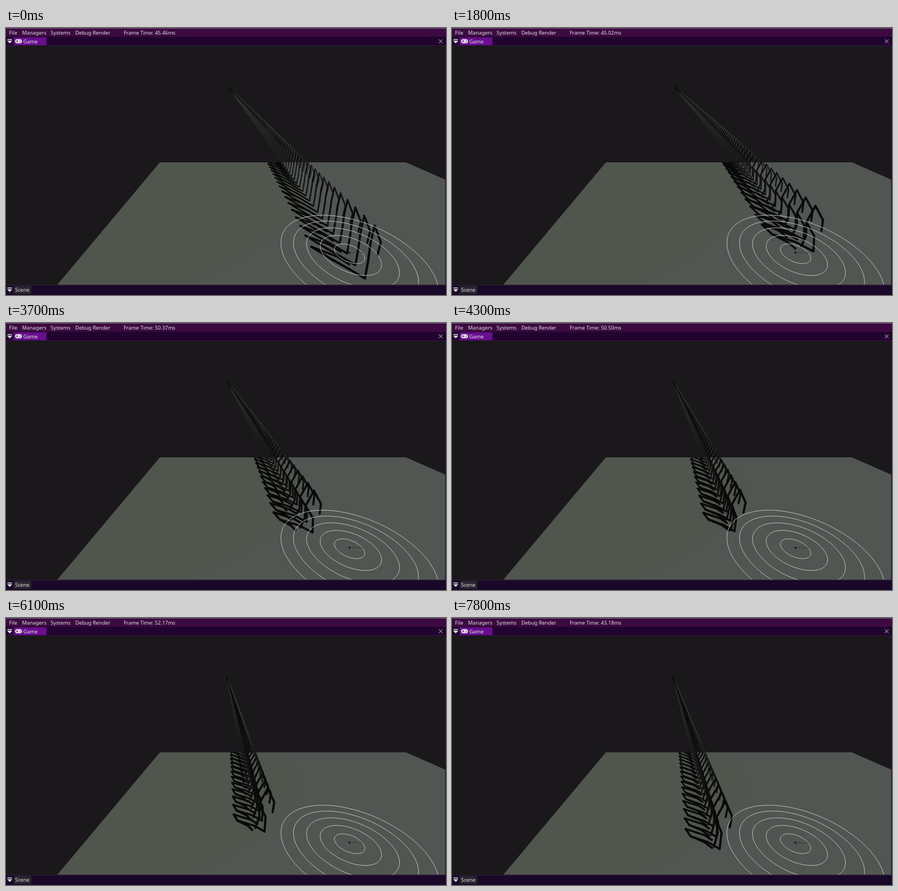
These frames come from a looping animation (800 px wide and 485 px high, 7.9 s). An HTML page with a canvas:

```html
<!DOCTYPE html>
<html lang="en">
<head>
<meta charset="utf-8">
<title>Game viewport</title>
<style>
  html, body { margin: 0; width: 100%; height: 100%; overflow: hidden; background: #1a181b; }
  canvas, svg { position: absolute; left: 0; top: 0; width: 800px; height: 485px; }
  text { font: 9.35px "Noto Sans", "Open Sans", sans-serif; fill: #e4dfe6; white-space: pre; }
</style>
</head>
<body>
<canvas id="scene" width="800" height="485"></canvas>
<svg viewBox="0 0 800 485">
  <g id="rings" fill="none" stroke="#c9cec8" stroke-width=".9"></g>
  <path d="M624 408H648" stroke="#30332f" stroke-width=".8"/>
  <path d="M622 406.5l4 .5-1 4z" fill="#080808"/>

  <path d="M0 0H800V16H0z" fill="#3c0a41"/>
  <path d="M0 0H800V1H0z" fill="#77617a"/>
  <path d="M0 16H800V32H0z" fill="#20032e"/>
  <path d="M14 17H73.5V31.5H14z" fill="#680e8e"/>
  <path d="M0 31H800V32H0z" fill="#3b0d50"/>
  <path d="M798.5 32H800V467H798.5z" fill="#2a1733"/>
  <path d="M0 466.5H800V485H0z" fill="#190827"/>
  <path d="M0 466.5H800V467.5H0z" fill="#34243c"/>
  <path d="M14 468.5H46V483H14z" fill="#29262e"/>

  <g id="fold" fill="#e4dfe6"><path d="M2.5 20h8.5v1.4H2.5zM2 23h9.5l-4.7 5z"/></g>
  <use href="#fold" y="451.5"/>
  <rect x="16.5" y="20.3" width="12.6" height="7.4" rx="3.7" fill="#e4dfe6"/>
  <path d="M18.4 24h3.6M20.2 22.2v3.6M24.4 25.2h1.4M26.2 22.8h1.4" stroke="#680e8e" stroke-width="1.2"/>
  <path d="M786.8 20.7l7 7m0-7l-7 7" stroke="#d5ced8"/>
  <text x="5.5" y="12">File</text>
  <text x="29.3" y="12">Managers</text>
  <text x="81" y="12">Systems</text>
  <text x="126" y="12">Debug Render</text>
  <text x="214" y="12" id="stat"></text>
  <text x="31.5" y="27.5">Game</text>
  <text x="16.5" y="479">Scene</text>
</svg>
<script>
const ctx = document.getElementById('scene').getContext('2d');
const stat = document.getElementById('stat');
const VANISH = { x: 400, y: 102 }, FAR_EDGE = 244;
const STEP = 0.074, COUNT = 560, STRIDE = 0.775;

// Rings are circles on a tilted plane; perspective enlarges and shifts the outer ones
document.getElementById('rings').innerHTML = [1, 2, 3, 4, 5].map(n => {
  let d = '';
  for (let i = 0; i < 72; i++) {
    const a = i * Math.PI / 36;
    const x = 624 + 0.77 * n * n + (27.4 + 0.26 * n) * n * Math.cos(a);
    const y = 409 + 1.04 * n * n + (17.7 + 0.26 * n) * n * Math.sin(a + 0.49);
    d += (i ? 'L' : 'M') + x.toFixed(1) + ' ' + y.toFixed(1);
  }
  return `<path d="${d}Z"/>`;
}).join('');

function ease(t, start, span) {
  const u = Math.min(1, Math.max(0, (t - start) / span));
  return u * u * (3 - 2 * u);
}

// The front walker: its place on the floor sets its size, the stride moves its limbs
function walker(t) {
  const floor = 378 + 3.8 * (t - 4.5) ** 2;
  const size = 0.272 * (floor - VANISH.y);
  const x = 670 - 195 * ease(t, 1.2, 4.6) + 22 * ease(t, 6, 1);
  const s = Math.sin(2 * Math.PI * t / STRIDE);
  const at = (dx, dy) => ({ x: x + dx * size, y: floor - size + dy * size });

  const top = at(0, 0), hip = at(-0.2 + 0.12 * ease(1 - t, 0, 1), 0.36);
  const leg = side => [
    hip,
    at(-0.12 + 0.1 * side * s, 0.66),
    at(-0.18 + 0.15 * side * s, 1 - 0.12 * Math.max(0, -side * s))
  ];
  const parts = [
    { line: leg(-1), lit: 45 },
    { line: leg(1), lit: 45 },
    { line: [top, hip], lit: 0 },
    { line: [top, at(0.12 + 0.05 * Math.abs(s), 0.31), at(0.06 + 0.08 * Math.abs(s), 0.55)], lit: 95 }
  ];

  const slant = 0.8 + 0.0021 * (x - 480);
  const cast = p => {
    const h = floor - p.y;
    return { x: p.x - slant * h, y: floor - slant / 2 * h };
  };
  return { parts, shadows: parts.map(p => p.line.map(cast)) };
}

function stroke(line, w, width, color) {
  ctx.beginPath();
  for (const p of line) {
    ctx.lineTo(VANISH.x + (p.x - VANISH.x) * w, VANISH.y + (p.y - VANISH.y) * w);
  }
  ctx.strokeStyle = color;
  ctx.lineWidth = width * w;
  ctx.stroke();
}

function ground() {
  ctx.fillStyle = '#525653';
  ctx.fill(new Path2D('M280 244H727L800 276V467H93z'));
  ctx.fillStyle = '#50554d';
  ctx.fill(new Path2D('M280 244H483C550 275 560 330 475 387Q420 427 345 467H93z'));
}

function draw(t) {
  const { parts, shadows } = walker(t);
  ctx.fillStyle = '#1a181b';
  ctx.fillRect(0, 0, 800, 485);
  ground();
  ctx.lineCap = ctx.lineJoin = 'round';

  ctx.save();
  ctx.beginPath();
  ctx.rect(0, FAR_EDGE, 800, 223);
  ctx.clip();
  for (let k = 24; k >= 0; k--) {
    for (const line of shadows) stroke(line, 1 / (1 + STEP * k), 3.8, '#070807');
  }
  ctx.restore();

  // Far copies catch more light, except at the very tip
  for (let k = COUNT; k >= 0; k--) {
    const w = 1 / (1 + STEP * k), light = (1 - w) ** 1.5 * Math.min(1, w * 14);
    for (const { line, lit } of parts) {
      const g = Math.round(9 + lit * light);
      stroke(line, w, 4, `rgb(${g},${g + 1},${g})`);
    }
  }
}

function frameCost(step) {
  const r = Math.sin(step * 12.73 + 4) * 4375.85;
  return 41 + 12.9 * (r - Math.floor(r));
}

let last = -1;
function tick(now) {
  const step = Math.floor(now % 7900 / 100);
  if (step !== last) {
    last = step;
    draw(step / 10);
    stat.textContent = `Frame Time: ${frameCost(step).toFixed(2)}ms`;
  }
  requestAnimationFrame(tick);
}
tick(0);
</script>
</body>
</html>
```
